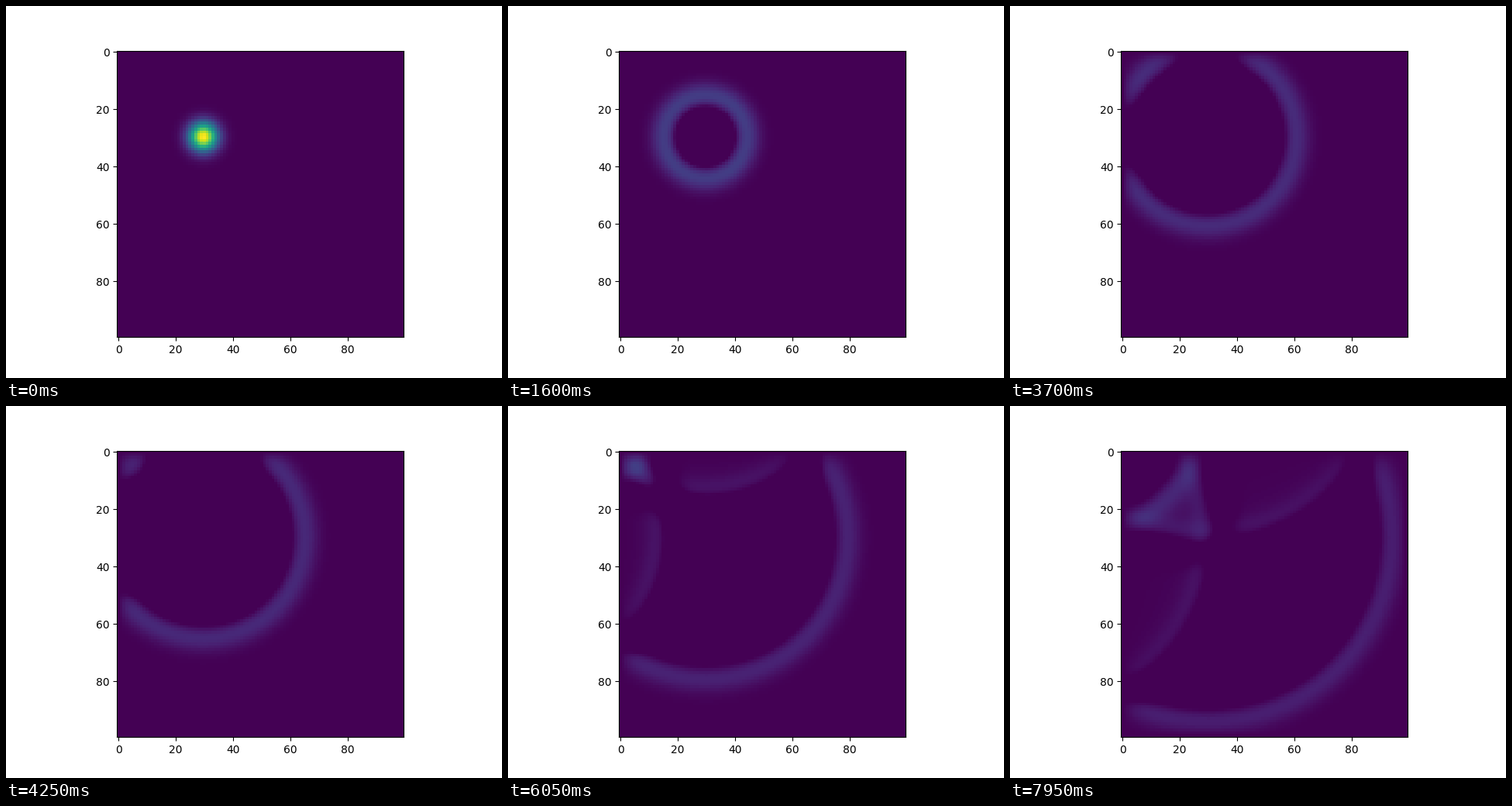
Animation, 640 px wide and 480 px high, one loop 8000 ms. Source, as a matplotlib script:

```python
import numpy as np
import matplotlib.pyplot as plt
from matplotlib.animation import FuncAnimation

N = 100          # grid points per side
FRAMES = 160
INTERVAL = 50    # ms
SPEED = 1.0
DT = 0.004
START = 0.3      # pulse centre on both axes
WIDTH = 0.05     # pulse radius


def simulate():
    """Wave equation on the unit square with fixed edges."""
    x = np.linspace(0, 1, N)
    gx, gy = np.meshgrid(x, x)
    courant2 = (SPEED * DT / x[1]) ** 2

    u = np.exp(-((gx - START) ** 2 + (gy - START) ** 2) / WIDTH ** 2)
    prev = u.copy()
    states = [u]
    for _ in range(FRAMES - 1):
        lap = (u[2:, 1:-1] + u[:-2, 1:-1] + u[1:-1, 2:] + u[1:-1, :-2]
               - 4 * u[1:-1, 1:-1])
        new = np.zeros_like(u)
        new[1:-1, 1:-1] = (2 * u - prev)[1:-1, 1:-1] + courant2 * lap
        prev, u = u, new
        states.append(u)
    return states


states = simulate()

fig, ax = plt.subplots(figsize=(6.4, 4.8), dpi=100)
image = ax.imshow(states[0], cmap="viridis", vmin=0, vmax=states[0].max())


def update(i):
    image.set_data(states[i])
    return [image]


anim = FuncAnimation(fig, update, frames=FRAMES, interval=INTERVAL,
                     repeat=True, repeat_delay=0)
plt.show()
```
